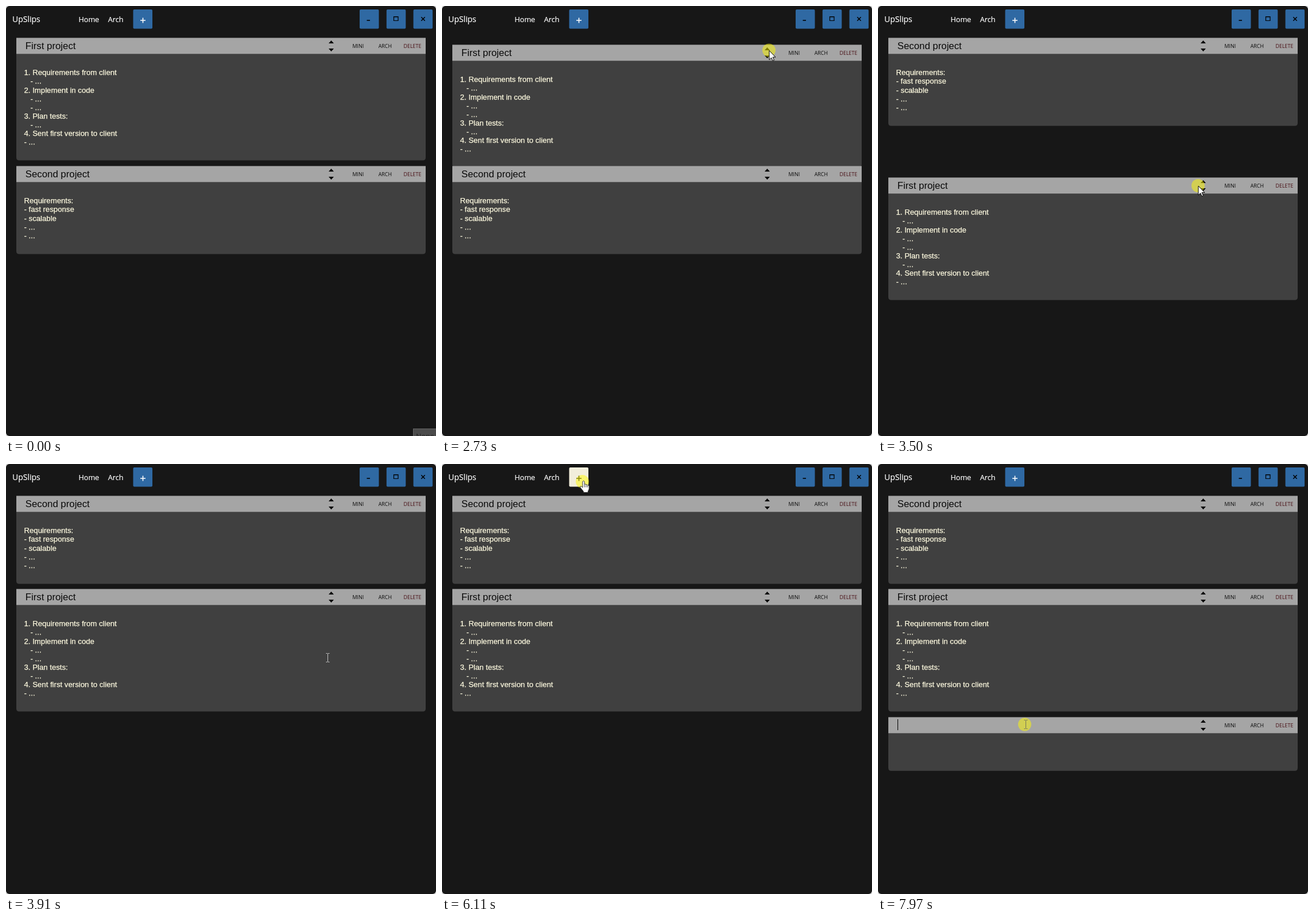
An HTML page for the animation above (8 s loop, 749x748 px).

```html
<!DOCTYPE html>
<html lang="en">
<head>
<meta charset="utf-8">
<title>UpSlips</title>
<style>
  html, body { margin: 0; width: 100%; height: 100%; overflow: hidden; background: #171717; }
  svg { display: block; width: 100%; height: 100%; }
  text { white-space: pre; }
  .ui { font-family: "Open Sans", "Noto Sans", sans-serif; font-size: 12.6px; fill: #fff; stroke: #fff; stroke-width: .2px; }
  .tag { font-family: "Open Sans", "Noto Sans", sans-serif; font-size: 8.9px; fill: #0a0a0a; }
  .head { font-family: "Liberation Sans", Arial, sans-serif; font-size: 16.8px; fill: #0a0a0a; }
  .note { font-family: "Liberation Sans", Arial, sans-serif; font-size: 13.2px; fill: #fffbe0; stroke: #fffbe0; stroke-width: .25px; }
</style>
</head>
<body>
<svg id="stage" viewBox="0 0 749 748">
  <rect width="749" height="748" fill="#ddd"/>
  <rect width="749" height="748" rx="6" fill="#171717"/>

  <text class="ui" x="11" y="28" style="font-size:14px">UpSlips</text>
  <text class="ui" x="126.5" y="28">Home</text>
  <text class="ui" x="177.8" y="28">Arch</text>

  <g fill="#2f69a3">
    <rect id="add" x="221.5" y="6" width="33.5" height="33.5" rx="2"/>
    <rect x="616" y="6" width="33.5" height="33.5" rx="2"/>
    <rect x="662.8" y="6" width="33.5" height="33.5" rx="2"/>
    <rect x="709.6" y="6" width="33.5" height="33.5" rx="2"/>
  </g>
  <path id="plus" d="M234 25h9M238.5 20.5v9" stroke="#fff" stroke-width="1.6"/>
  <path d="M628.5 25h5.5" stroke="#000" stroke-width="1.6"/>
  <path d="M675.5 18.5h7.5v7h-7.5zM675 19h8.5" fill="none" stroke="#000" stroke-width="1.2"/>
  <path d="M723.3 19.3l6.4 6.4m0-6.4l-6.4 6.4" stroke="#000" stroke-width="1.5"/>

  <g id="cards"></g>

  <g id="tip">
    <rect x="709.5" y="735.5" width="45" height="20" fill="#4b4b4b" stroke="#666"/>
    <text class="ui" x="714" y="753" style="fill:#222;stroke:none">None</text>
  </g>

  <circle id="press" r="11.5" fill="#fffa00" fill-opacity=".5"/>
  <g id="arrow" stroke="#000" stroke-linejoin="round">
    <path fill="#fff" d="M.5 .5V16.5L4.2 13L6.7 18.3L9 17.2L6.6 12H11.5Z"/>
  </g>
  <path id="beam" fill="none" d="M-1.5-7.5h2.5M2-7.5h2.5M1.5-7V7M-1.5 7.5h2.5M2 7.5h2.5"/>
  <g id="hand" stroke="#222" stroke-width=".9" stroke-linejoin="round">
    <g transform="translate(0 -1.5)">
      <path fill="#fff" d="M.4 1.5Q2-.8 3.6 1.5V6.3Q5.7 5.2 6.5 7Q8.6 6.3 9.3 8Q11.6 7.5 11.7 9.5V13.5Q11.5 16.5 9.8 18.2V20.5H1.8V18.5L-3.6 12Q-4.3 9.3-2 9.7L.4 12Z"/>
      <path fill="none" d="M3.6 6.5v5M6.5 7.5v4M9.2 8.5v3"/>
    </g>
  </g>
</svg>
<script>
const LOOP = 8000;
const NS = "http://www.w3.org/2000/svg";
const $ = id => document.getElementById(id);

function node(parent, name, attrs, text) {
  const el = document.createElementNS(NS, name);
  for (const k in attrs) el.setAttribute(k, attrs[k]);
  if (text) el.textContent = text;
  parent.appendChild(el);
  return el;
}

function makeCard(title, height, lines) {
  const g = node($("cards"), "g", {});
  const box = node(g, "g", { transform: "translate(0 .4)" });
  node(box, "path", { fill: "#404040", d: `M18 28H731V${height - 5}q0 5-5 5H23q-5 0-5-5Z` });
  node(box, "rect", { x: 18, width: 713, height: 28, fill: "#a5a5a5" });
  node(g, "text", { class: "head", x: 33.8, y: 20 }, title);
  node(g, "path", { d: "M562 10l4.5-5 4.5 5zM562 19h9l-4.5 5z" });
  node(g, "text", { class: "tag", x: 603.5, y: 18 }, "MINI");
  node(g, "text", { class: "tag", x: 648.7, y: 18 }, "ARCH");
  node(g, "text", { class: "tag", x: 692.6, y: 18, style: "fill:#450a10" }, "DELETE");
  lines.forEach((s, i) => node(g, "text", { class: "note", x: 31.5, y: 65.2 + i * 15.15 }, s));
  return { g, height, top: 0, shown: true };
}

const first = makeCard("First project", 213, [
  "1. Requirements from client", "   - ...", "2. Implement in code", "   - ...", "   - ...",
  "3. Plan tests:", "   - ...", "4. Sent first version to client", "- ..."]);
const second = makeCard("Second project", 153, [
  "Requirements:", "- fast response", "- scalable", "- ...", "- ..."]);
const blank = makeCard("", 93.3, []);
const caret = node(blank.g, "path", { d: "M34.5 4V23", stroke: "#000" });
const cards = [first, second, blank];

// Screen refreshes: start, end, number of steps
const bursts = [[0, 0, 1], [460, 1240, 12], [1310, 2000, 11], [2200, 2200, 1], [2590, 3360, 12],
  [3430, 3710, 5], [3910, 3910, 1], [4240, 5020, 12], [5090, 5580, 8], [6110, 6890, 12],
  [6940, 7620, 11], [7970, 7970, 1]];

function snap(t) {
  const [a, b, n] = bursts.filter(s => s[0] <= t).pop();
  if (t >= b) return b;
  const step = (b - a) / (n - 1);
  return a + Math.floor((t - a) / step + 0.001) * step;
}

const lin = p => p;
const easeIn = p => p ** 1.5;
const easeOut = p => 1 - (1 - p) ** 1.8;
const hold = () => 0;

// Time, x, y, easing towards the next point
const pointer = [
  [460, 686, 736, lin], [1240, 524, 264, easeOut], [2000, 572, 65, hold],
  [2200, 570, 64.5, hold], [2590, 570, 65, lin], [2730, 569.5, 77, lin],
  [3220, 557.3, 206, lin], [3360, 557.3, 257, lin], [3500, 557.5, 312.5, easeOut],
  [3710, 558, 342, hold], [3910, 559, 337, hold], [4190, 559, 337, easeIn],
  [5020, 304, 61.5, easeOut], [5580, 244.5, 30.5, hold], [6250, 244.5, 30.5, easeIn],
  [6890, 255.5, 186, easeOut], [7620, 255.5, 453, hold]];

const drag = [[2590, 55, lin], [2730, 67, lin], [3220, 193, lin], [3360, 244, lin],
  [3500, 298, easeOut], [3710, 328, hold], [3910, 217, hold]];

function at(keys, t, col) {
  let i = 0;
  while (i < keys.length - 1 && keys[i + 1][0] <= t) i++;
  const a = keys[i], b = keys[i + 1];
  if (!b || t <= a[0]) return a[col];
  const p = a[a.length - 1]((t - a[0]) / (b[0] - a[0]));
  return a[col] + (b[col] - a[col]) * p;
}

const show = (el, on) => el.setAttribute("display", on ? "inline" : "none");
const move = (el, x, y) => el.setAttribute("transform", `translate(${x} ${y})`);

function draw(now) {
  const t = snap(now);
  first.top = Math.round(at(drag, t, 1));
  second.top = t < 3430 ? 278 : 55;
  blank.top = 440;
  blank.shown = t >= 6180;
  for (const c of cards) {
    move(c.g, 0, c.top);
    show(c.g, c.shown);
  }
  show(caret, t >= 7970);
  show($("tip"), now < 70);

  const x = at(pointer, t, 1), y = at(pointer, t, 2);
  const dragging = t >= 2590 && t < 3910;
  const hover = x > 221 && x < 255 && y > 6 && y < 40;
  const over = cards.find(c => c.shown && y >= c.top && y < c.top + c.height - 8);
  const onHead = over && y < over.top + 28;
  const typing = !dragging && over && (!onHead || x < 550);
  const kind = t < 460 ? "" : hover ? "hand" : typing ? "beam" : "arrow";
  for (const id of ["arrow", "beam", "hand"]) {
    show($(id), id === kind);
    move($(id), id === "beam" ? Math.round(x) : x, id === "beam" ? Math.round(y) : y);
  }
  $("beam").setAttribute("stroke", onHead ? "#777758" : "#c4c4c4");
  $("add").setAttribute("fill", hover ? "#f2eedb" : "#2f69a3");
  $("plus").setAttribute("stroke", hover ? "#111" : "#fff");
  show($("press"), dragging || (t >= 6110 && t < 6250) || t >= 7970);
  move($("press"), x, y);
}

const start = performance.now();
function tick() {
  draw((performance.now() - start) % LOOP);
  requestAnimationFrame(tick);
}
tick();
</script>
</body>
</html>
```
